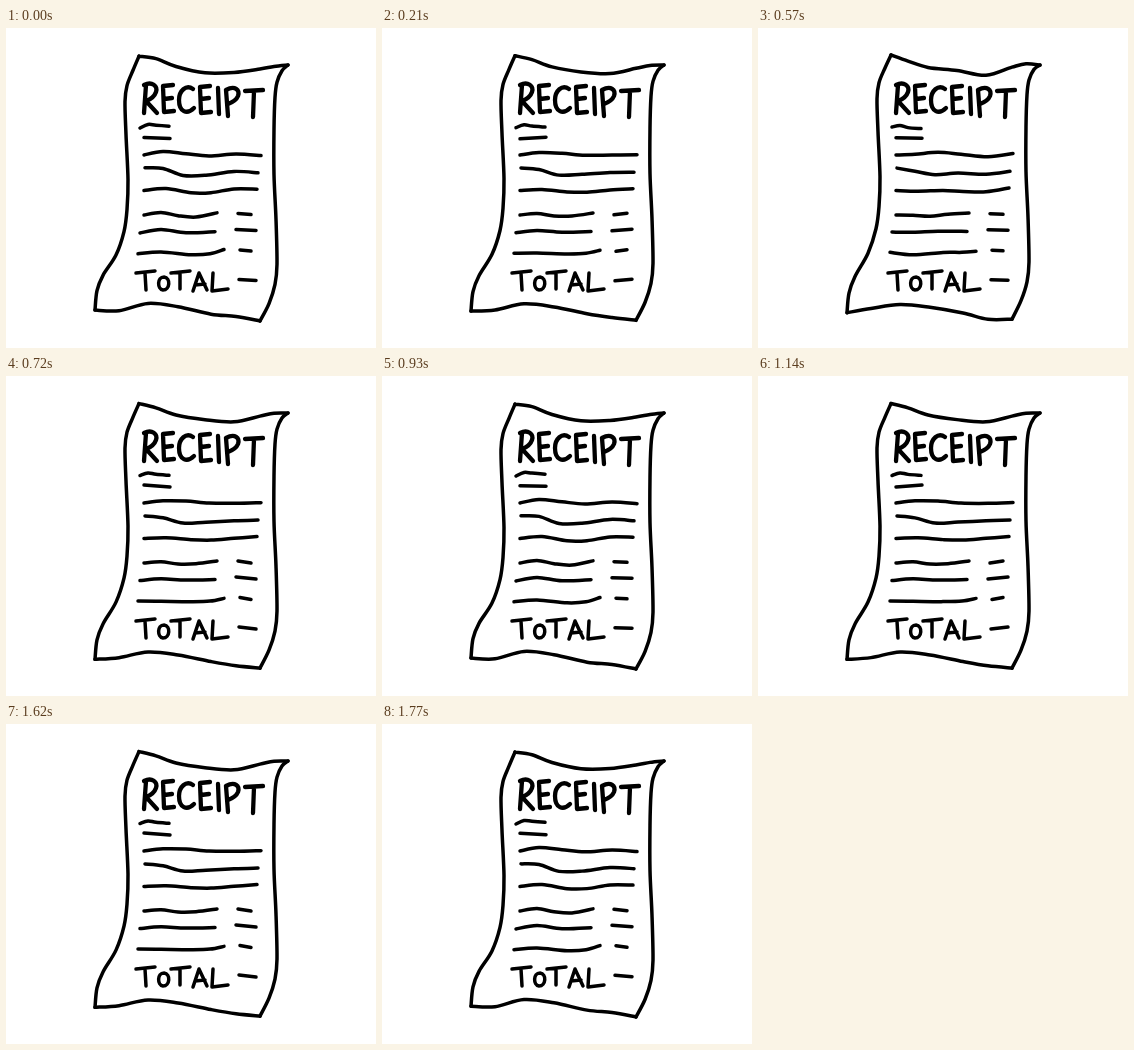
Animation, 370 px wide and 320 px high, one loop 1.8 s. Source, as an HTML page with a canvas:

```html
<!DOCTYPE html>
<html lang="en">
<head>
<meta charset="utf-8">
<title>Receipt</title>
<style>
html, body { margin: 0; width: 100%; height: 100%; overflow: hidden; background: #fff; }
canvas { display: block; }
</style>
</head>
<body>
<canvas width="370" height="320" aria-label="RECEIPT TOTAL"></canvas>
<script>
const ctx = document.querySelector('canvas').getContext('2d');
const CYCLE = 900, STEP = 30, TAU = Math.PI * 2;

// Paper edges, clockwise from the top left corner
const edges = [
  [[133, 27.5], [150, 32], [170, 39], [199, 43.5], [228, 46], [254, 40], [268, 37], [282, 37]],
  [[282, 37], [276, 42], [271, 53], [269, 68], [268, 100], [268, 145], [270, 190], [271, 235], [269, 255], [263, 274], [254, 292]],
  [[254, 292], [230, 290], [205, 285.5], [172, 279], [142, 276], [113, 281.5], [89, 283.5]],
  [[89, 283.5], [91, 264], [97, 248], [110, 226], [118, 202], [121, 180], [122, 150], [120, 105], [119, 72], [121, 56], [127, 41], [133, 27.5]]
];
// Written lines
const lines = [
  [[134, 99.5], [142, 97], [150, 98.5], [163, 99.5]],
  [[138, 127], [157, 125], [180, 125], [203, 127], [230, 127.5], [255, 126.5]],
  [[139, 140], [157, 142], [177, 147], [200, 146], [228, 145], [252, 144]],
  [[138, 162.5], [160, 162], [185, 163.5], [205, 164], [228, 162.5], [251, 160.5]],
  [[138, 187], [155, 186], [172, 188], [190, 187.5], [211, 185]],
  [[134, 204.5], [155, 203], [180, 204], [209, 203.5]],
  [[132, 225], [155, 225.5], [185, 225.5], [204, 225], [218, 222.5]]
];
// Short dashes: left, right, height
const dashes = [[138, 164, 110], [232, 245, 186], [230, 250, 202], [234, 245, 222.5], [233, 250, 252]];

const heading = new Path2D([
  'M140 57L138 85M138 57C146 53 152 58 150 64Q148 70 140 73L151 85', // R
  'M167 57L157 58L158 84L168 83M158 71L166 70',                    // E
  'M187 61C180 56 173 63 173 72C173 84 181 87 188 80',             // C
  'M204 58L194 59L195 85L205 84M195 71L203 70',                    // E
  'M212 60L213 86',                                                // I
  'M220 62L222 88M220 62C229 57 234 62 232 68Q230 73 222 76',      // P
  'M239 63L257 62M248 63L247 89'                                   // T
].join(''));
const footing = new Path2D([
  'M130 245L149 243M139 245L140 262',                              // T
  'M158 249C151 249 151 261 157 262C164 262 165 250 158 249',      // O
  'M165 245L184 243M174 245L174 261',                              // T
  'M187 263L193 245L201 262M189 257L199 256',                      // A
  'M207 245L206 263L222 261'                                       // L
].join(''));

// Smooth open curve through all points
function curve(pts) {
  const at = i => pts[Math.max(0, Math.min(pts.length - 1, i))];
  ctx.beginPath();
  ctx.moveTo(...pts[0]);
  for (let i = 0; i < pts.length - 1; i++) {
    const [a, b, c, d] = [at(i - 1), at(i), at(i + 1), at(i + 2)];
    ctx.bezierCurveTo(
      b[0] + (c[0] - a[0]) / 6, b[1] + (c[1] - a[1]) / 6,
      c[0] - (d[0] - b[0]) / 6, c[1] - (d[1] - b[1]) / 6, ...c);
  }
  ctx.stroke();
}

function draw(now) {
  const phase = TAU * (Math.floor(now / STEP) * STEP / CYCLE);
  const sway = -1.6 * Math.cos(phase - 0.2);
  const tilt = Math.cos(phase - TAU / 3);
  // A standing wave across the paper makes every stroke wobble
  const wobble = ([x, y]) => [x, y + sway * Math.cos(TAU * (x - 228) / 72)];

  ctx.fillStyle = '#fff';
  ctx.fillRect(0, 0, 370, 320);
  ctx.strokeStyle = '#000';
  ctx.lineCap = ctx.lineJoin = 'round';

  ctx.lineWidth = 3.5;
  for (const stroke of [...edges, ...lines]) curve(stroke.map(wobble));
  for (const [left, right, y] of dashes) curve([[left, y + tilt], [right, y - tilt]]);
  ctx.stroke(footing);
  ctx.lineWidth = 4.3;
  ctx.stroke(heading);
}

const start = performance.now();
function tick() {
  draw(performance.now() - start);
  requestAnimationFrame(tick);
}
tick();
</script>
</body>
</html>
```
